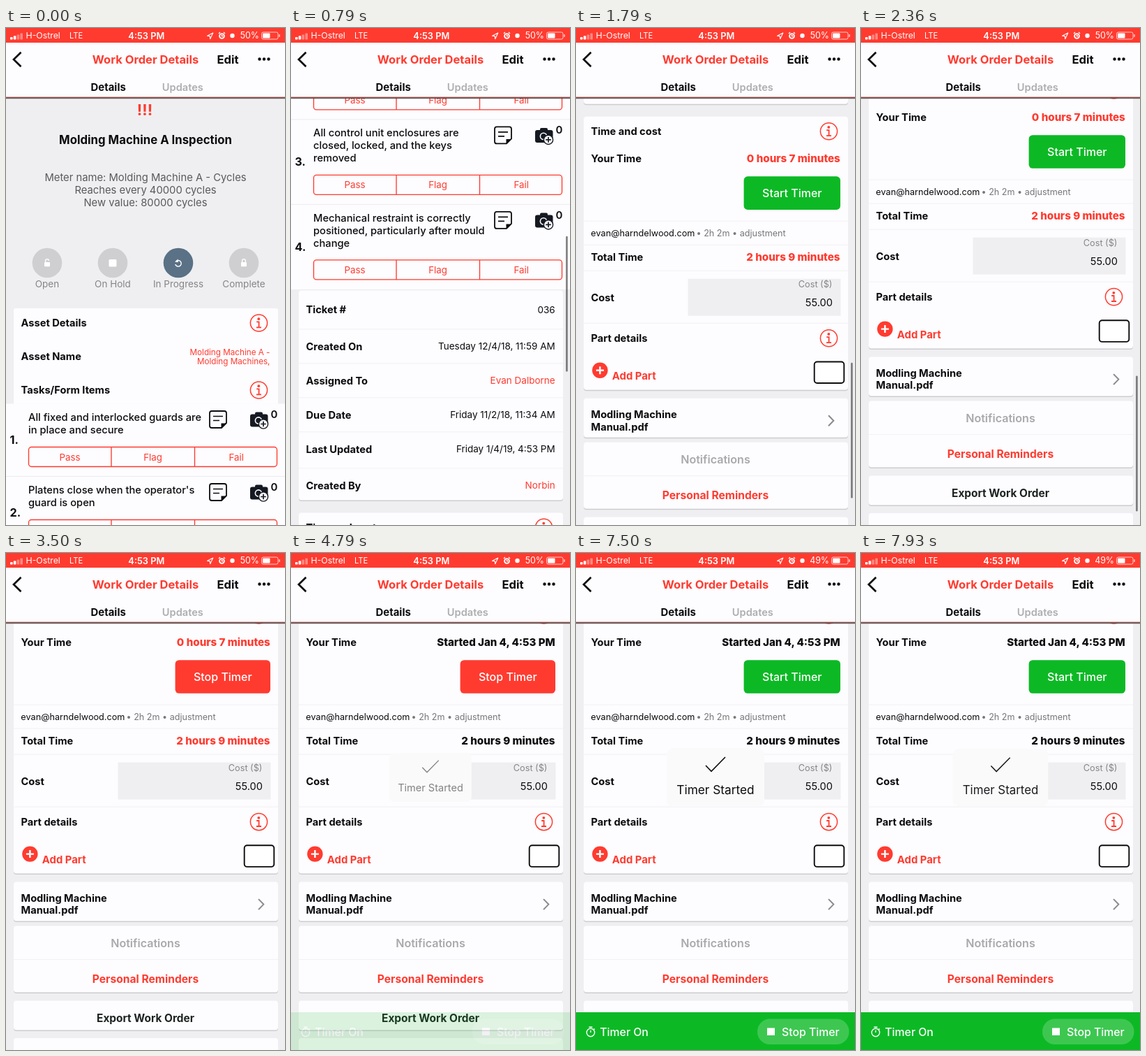
Recreate the animation shown at these times as an HTML page. Size 400 by 711 pixels, loop 8000 ms.

```html
<!DOCTYPE html>
<html lang="en">
<head>
<meta charset="utf-8">
<title>Work Order Details</title>
<style>
html, body { margin: 0; width: 100%; height: 100%; overflow: hidden; background: #efeff1; }
svg { display: block; width: 100%; height: 100%; font-family: Inter, Roboto, sans-serif; }
</style>
</head>
<body>
<svg id="stage" viewBox="0 0 400 711" xmlns="http://www.w3.org/2000/svg"></svg>
<script>
const RED = '#ff3b30', GREEN = '#0cb925', INK = '#0c0c0e', WHITE = '#fdfcfe', GREY = '#858588';
const LOOP = 8000, TICK = 1000 / 7;

// y is the middle of the capitals
function text(s, x, y, size, weight = 400, fill = INK, anchor = 'start') {
  return `<text x="${x}" y="${(y + size * .36).toFixed(2)}" font-size="${size}" font-weight="${weight}" fill="${fill}" text-anchor="${anchor}">${s}</text>`;
}
const mid = (s, x, y, size, weight, fill) => text(s, x, y, size, weight, fill, 'middle');
const end = (s, x, y, size, weight, fill) => text(s, x, y, size, weight, fill, 'end');
const label = (s, y) => text(s, 21.5, y, 14.65, 700);
const rect = (x, y, w, h, fill, r = 0, more = '') =>
  `<rect x="${x}" y="${y}" width="${w}" height="${h}" rx="${r}" fill="${fill}" ${more}/>`;
const circle = (x, y, r, fill, more = '') => `<circle cx="${x}" cy="${y}" r="${r}" fill="${fill}" ${more}/>`;
const line = (d, stroke, width, more = '') => `<path d="${d}" fill="none" stroke="${stroke}" stroke-width="${width}" ${more}/>`;
const group = (id, body, more = '') => `<g id="${id}" ${more}>${body}</g>`;
const rule = (y, x = 11, w = 379) => rect(x, y, w, 1, '#f1f0f4');
const card = (y, h) => rect(11, y + 1.5, 379, h, '#cdcdd1', 4) + rect(11, y, 379, h, WHITE, 4);

function info(y) {
  return circle(362.5, y, 12.1, 'none', `stroke="${RED}" stroke-width="1.5"`) +
    circle(362.3, y - 5.8, 1.9, RED) +
    line(`M359.2 ${y - 1.6}h3.4v8m-3.6 0h7`, RED, 1.8);
}

function noteIcon(y) {
  return line(`M295 ${y - 12}h18q3 0 3 3v14l-7 7h-14q-3 0-3-3v-18q0-3 3-3z`, INK, 1.8, 'stroke-linejoin="round"') +
    `<path d="M308.5 ${y + 12.5}v-7h7.5z" fill="${INK}"/>` +
    line(`M297 ${y - 4.5}h14m-14 6h9`, INK, 1.7);
}

function cameraIcon(y) {
  return rect(350, y - 8, 25.5, 18, '#151922', 3) + rect(357, y - 11, 11, 6, '#151922', 2) +
    circle(362, y + 1, 5.4, WHITE) + circle(362, y + 1, 3.8, '#151922') +
    circle(369, y + 6, 6.6, WHITE, 'stroke="#151922" stroke-width="1.4"') +
    line(`M365.2 ${y + 6}h7.6m-3.8-3.8v7.6`, '#151922', 1.7);
}

function tasks() {
  const list = [
    ['All fixed and interlocked guards are', 'in place and secure'],
    ["Platens close when the operator's", 'guard is open'],
    ['All control unit enclosures are', 'closed, locked, and the keys', 'removed'],
    ['Mechanical restraint is correctly', 'positioned, particularly after mould', 'change']
  ];
  let y = 537.5, out = rect(0, y, 400, 451, WHITE);
  list.forEach((lines, i) => {
    const h = 69 + 17.5 * lines.length, b = y + h - 42;
    lines.forEach((s, k) => out += text(s, 32, y + 19.3 + k * 17.8, 14.7, 500));
    out += text(i + 1 + '.', 5.5, y + h / 2, 16.2, 700) + noteIcon(y + 22.5) + cameraIcon(y + 23) +
      mid('0', 384.5, y + 15, 15, 600) +
      rect(32.5, b, 356, 28, 'none', 4, `stroke="${RED}" stroke-width="1.35"`) +
      line(`M151 ${b}v28M270.5 ${b}v28`, RED, 1.35) +
      mid('Pass', 91.5, b + 14.3, 13.3, 400, RED) +
      mid('Flag', 210.5, b + 14.3, 13.3, 400, RED) +
      mid('Fail', 330.3, b + 14.3, 13.3, 400, RED);
    y += h;
    if (i < 3) out += rect(0, y - .5, 400, 1, '#ececf0');
  });
  return out;
}

function statuses() {
  const names = ['Open', 'On Hold', 'In Progress', 'Complete'];
  const lock = (x, d) => rect(x - 4, 335, 8, 6.2, '#fff', 1) + line(`M${x - 2.4} 335v-2a2.4 2.4 0 0 1 4.8 0${d}`, '#fff', 1.3);
  const marks = [
    lock(59, ''),
    rect(147.5, 331, 11, 10.5, '#fff', 1.5),
    line('M243.5 334.2a4.3 4.3 0 1 1-.7 3.8', '#fff', 1.4) + '<path d="M242.2 334.6l4.4-4v4.6z" fill="#fff"/>',
    lock(341, 'v2')
  ];
  return names.map((s, i) => {
    const x = 59 + 94 * i, on = i == 2;
    return circle(x, 336, 21.3, on ? '#5a7186' : '#cfcfd1') + marks[i] + mid(s, x, 366, 13.5, 400, GREY);
  }).join('');
}

function ticket() {
  const rows = [
    ['Ticket #', '036', 1017.6], ['Created On', 'Tuesday 12/4/18, 11:59 AM', 1070],
    ['Assigned To', 'Evan Dalborne', 1119, RED], ['Due Date', 'Friday 11/2/18, 11:34 AM', 1168],
    ['Last Updated', 'Friday 1/4/19, 4:53 PM', 1217], ['Created By', 'Norbin', 1269, RED]
  ];
  return card(990, 300) + rows.map(([a, b, y, c], i) =>
    label(a, y) + end(b, 378.7, y, 13.5, 400, c) + (i ? rule(y - 25) : '')).join('');
}

const timerButton = (id, s, x, fill) =>
  group(id, rect(x, 1393.6, 379 - x, 47.6, fill, 5.5) + mid(s, (x + 379) / 2, 1417.7, 16, 500, '#fff'));

function costs() {
  return card(1308, 391) + label('Time and cost', 1329) + info(1329) + label('Your Time', 1368) +
    group('spent', end('0 hours 7 minutes', 378.8, 1368, 15.15, 800, RED)) +
    group('started', end('Started Jan 4, 4:53 PM', 378.8, 1368, 15.05, 800)) +
    timerButton('start', 'Start Timer', 240.6, GREEN) + timerButton('stop', 'Stop Timer', 242.6, RED) +
    rule(1457) + text('evan@harndelwood.com', 21.3, 1475, 12.7) +
    text('• 2h 2m • adjustment', 172.5, 1475, 12.6, 400, '#77777a') + rule(1491) +
    label('Total Time', 1509) +
    group('total', end('2 hours 9 minutes', 378.5, 1509, 15.15, 800, 'currentColor')) + rule(1528) +
    rect(160.5, 1540, 219, 53, '#efeff1') +
    label('Cost', 1567) + end('Cost ($)', 367.5, 1548, 12.7, 400, GREY) + end('55.00', 368, 1574, 14.6) +
    rule(1603) + label('Part details', 1625) + info(1625) +
    circle(34.4, 1671, 11.2, RED) + line('M28.9 1671h11m-5.5-5.5v11', '#fff', 2.4) +
    text('Add Part', 51.8, 1679, 14.85, 700, RED) +
    rect(341.7, 1658.7, 42.6, 30.6, '#fff', 4, `stroke="${INK}" stroke-width="1.9"`);
}

function footer() {
  return card(1711, 56) + label('Modling Machine', 1734) + label('Manual.pdf', 1751.5) +
    line('M362 1735.5l7.3 7.5-7.3 7.5', '#8b8b8e', 2) +
    card(1774, 95) + mid('Notifications', 200, 1798.5, 16.1, 600, '#a9a9ac') + rule(1821.5) +
    mid('Personal Reminders', 200, 1849.5, 15.6, 700, RED) +
    card(1881, 42) + mid('Export Work Order', 200, 1905.5, 15.4, 700, '#1d2422') + card(1934.5, 60);
}

function page() {
  return mid('!!!', 199, 117, 22, 700, RED) +
    mid('Molding Machine A Inspection', 200, 160, 16.75, 700) +
    mid('Meter name: Molding Machine A - Cycles', 200, 214, 14.8, 400, '#5a5a5e') +
    mid('Reaches every 40000 cycles', 200, 232, 14.8, 400, '#5a5a5e') +
    mid('New value: 80000 cycles', 200, 249.7, 14.8, 400, '#5a5a5e') +
    statuses() + rect(11, 401, 379, 140, WHITE, 3) +
    label('Asset Details', 422) + info(422) + label('Asset Name', 470) +
    end('Molding Machine A -', 378.5, 463.5, 11.7, 400, RED) +
    end('Molding Machines,', 378.5, 477, 11.7, 400, RED) +
    label('Tasks/Form Items', 518) + info(518) +
    tasks() + ticket() + costs() + footer();
}

function header() {
  const bars = [0, 1, 2, 3].map(i =>
    rect(6 + i * 4.8, 13 - i * 1.8, 3.6, 3.5 + i * 1.8, '#fff', .8, `opacity="${i < 2 ? 1 : .4}"`)).join('');
  return rect(0, 0, 400, 100, WHITE) + rect(0, 0, 400, 21, RED) + bars +
    text('H-Ostrel', 28.5, 11, 12.3, 400, '#fff') + text('LTE', 91, 11, 11.2, 400, '#fff') +
    mid('4:53 PM', 201.3, 11, 12.8, 600, '#fff') +
    line('M288.5 11.3l8.3-4.3-4 8.6-.6-4z', '#fff', 1.1, 'stroke-linejoin="round"') +
    circle(309.5, 11.5, 3.4, 'none', 'stroke="#fff" stroke-width="1.9"') +
    line('M305 8l2-2m7 2l-2-2M309.5 9.5v2h1.6', '#fff', 1.3) +
    circle(324.5, 11, 3.2, '#fff') +
    group('full', end('50%', 363, 11, 12.4, 400, '#fff')) + group('less', end('49%', 363, 11, 12.4, 400, '#fff')) +
    rect(366.5, 6, 23.5, 10, 'none', 2.4, 'stroke="#fff" stroke-opacity=".75"') +
    rect(368, 7.5, 10.5, 7, '#fff', 1) + rect(391.2, 9, 1.5, 4, '#fff', .7, 'opacity=".75"') +
    line('M21.5 34.8L11 45l10.5 10.2', INK, 2.7) +
    mid('Work Order Details', 200, 45.3, 16.5, 700, RED) + mid('Edit', 318, 45.3, 16.6, 700) +
    [363.5, 370, 376.5].map(x => circle(x, 44.5, 2.2, INK)).join('') +
    mid('Details', 146.7, 84.5, 14.9, 700) + mid('Updates', 253.3, 84.5, 14.6, 600, '#aeaeb1') +
    rect(0, 98.5, 400, .8, '#d9574f') + rect(0, 99.2, 400, 1.6, '#554141') +
    rect(0, 100.8, 400, 1.2, '#000', 0, 'opacity=".13"');
}

function timerBar() {
  return rect(0, 657, 400, 54, GREEN) +
    circle(21, 686, 5.7, 'none', 'stroke="#fff" stroke-width="1.4"') +
    line('M18.5 678.3h5M21 686v-3.2M25.5 680.5l1.3 1.3', '#fff', 1.4) +
    text('Timer On', 34.3, 685, 15.8, 500, '#fff') +
    rect(260, 666.5, 131.5, 36.5, '#fff', 18, 'opacity=".2"') +
    rect(274, 679.5, 11, 10.5, '#fff') + text('Stop Timer', 295, 685, 15.8, 500, '#fff');
}

const toast = rect(-70, -42, 140, 84, '#fafafb', 9) + group('message',
  line('M-14-17l8 8.3 20-20.3', INK, 1.6) + mid('Timer Started', 0, 18, 17.3));

document.getElementById('stage').innerHTML = rect(0, 0, 400, 711, '#efeff1') + group('page', page()) +
  rect(394, 0, 2.8, 194, '#000', 1.4, 'id="thumb"') +
  group('bar', timerBar()) + group('toast', toast) + header();

const $ = id => document.getElementById(id);
const show = (id, on) => $(id).setAttribute('opacity', +on);
// value of the last [time, value] step reached
const step = (t, first, ...steps) => steps.reduce((v, [at, next]) => t >= at ? next : v, first);

// a flick that slows down and is then caught
function scrollAt(t) {
  if (t < 500) return 0;
  const q = Math.min(500 + Math.floor((t - 500) / TICK + .001) * TICK, 2358);
  return Math.min(1240.5, 1267.5 - 652.5 * Math.exp((786 - q) / 494));
}

function draw(t) {
  const y = scrollAt(t);
  $('page').setAttribute('transform', `translate(0 ${-y.toFixed(2)})`);
  $('thumb').setAttribute('y', 101.5 + y * .3193);
  show('thumb', step(t, 0, [500, .47], [2930, .33], [3080, .12], [3220, 0]));

  const stopping = t >= 3500 && t < 7500, saved = t >= 4790;
  show('stop', stopping);
  show('start', !stopping);
  show('spent', !saved);
  show('started', saved);
  $('total').setAttribute('color', saved ? INK : RED);

  show('bar', step(t, 0, [4790, .14], [4930, .75], [5080, 1]));
  show('toast', saved);
  show('message', step(t, 0, [4790, .5], [4930, 1], [7930, .93]));
  const size = step(t, .84, [4930, 1], [7930, .975]);
  $('toast').setAttribute('transform', `translate(200 321) scale(${size})`);

  show('full', t < 5650);
  show('less', t >= 5650);
}

const begin = performance.now();
function frame() {
  draw((performance.now() - begin) % LOOP);
  requestAnimationFrame(frame);
}
frame();
</script>
</body>
</html>
```
